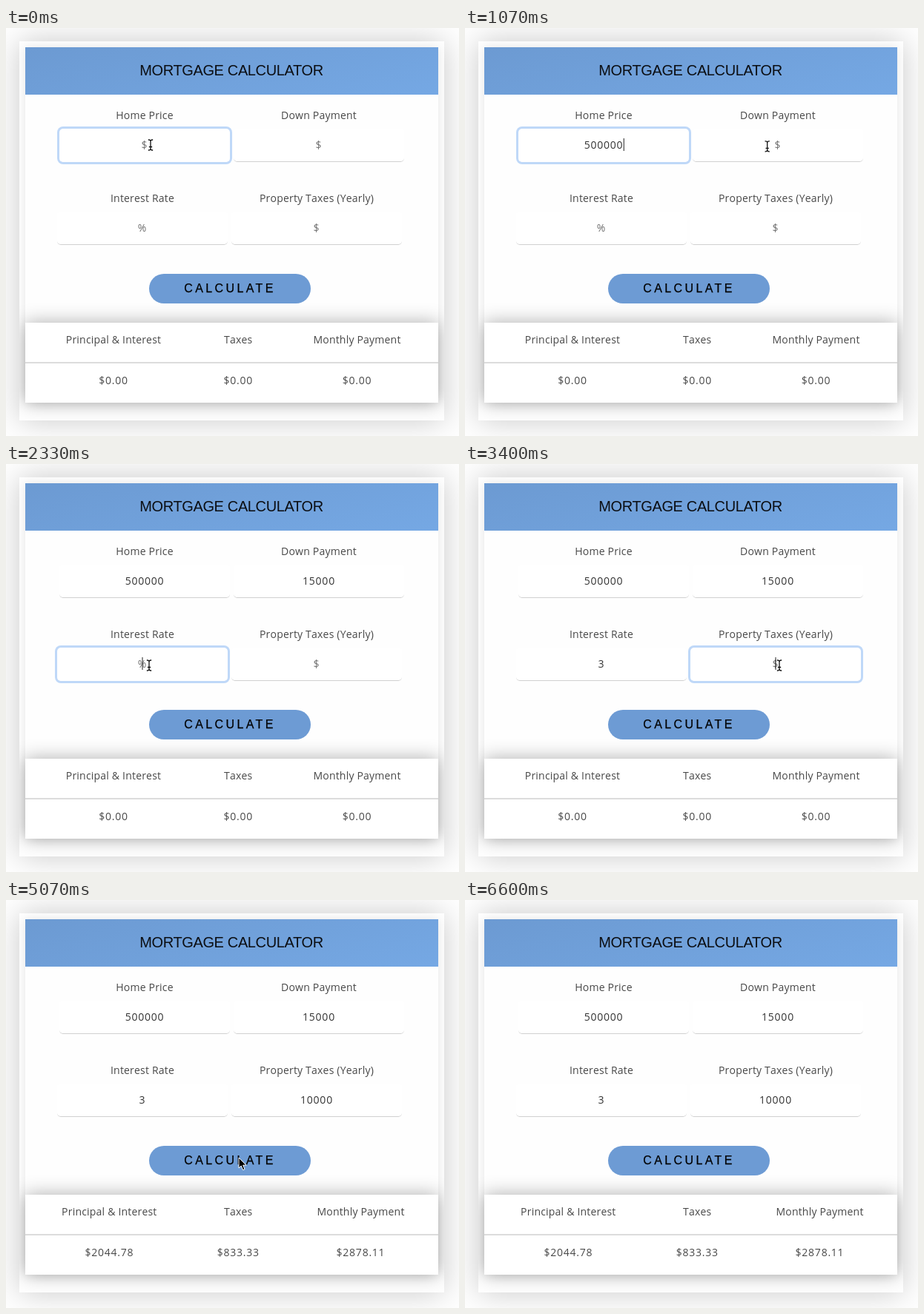
Recreate the animation shown at these times as an HTML page. Size 611 by 551 pixels, loop 6.67 s.

```html
<!DOCTYPE html>
<html lang="en">
<head>
<meta charset="utf-8">
<title>Mortgage Calculator</title>
<style>
  html, body { margin: 0; width: 100%; height: 100%; overflow: hidden; background: #fff; }
  #stage { position: absolute; left: 0; top: 0; width: 611px; height: 551px; overflow: hidden; }
  #stage div { position: absolute; box-sizing: border-box; }
  #frame { left: 18px; top: 18px; width: 573px; height: 512px; }
  #shade { inset: 0; box-shadow: 0 0 40px rgba(0,0,0,.22); }
  #clip { inset: 0; background: #fefefe; overflow: hidden; }
  #card { left: 8px; top: 8px; width: 557px; height: 480px; background: #fefefe; box-shadow: 0 0 14px rgba(0,0,0,.1); }
  #head { left: 8px; top: 8px; width: 557px; height: 64px; background: linear-gradient(165deg, #6c9ad2, #75a8e4); }
  #results { left: 8px; top: 380px; width: 557px; height: 108px; background: #fff; box-shadow: 0 0 24px rgba(0,0,0,.32); }
  #rule { left: 0; top: 53px; width: 557px; height: 2px; background: #dcdcdc; }
  #button { left: 193px; top: 332px; width: 218px; height: 40px; border-radius: 20px; background: #6d9bd4; }
  .field { width: 230px; height: 45px; background: #fff; border-bottom: 1px solid #d0d0d0; border-radius: 5px; }
  .field.focus { border-color: #fff; box-shadow: 0 0 0 3px #bfd8f8; }
  svg { position: absolute; left: 0; top: 0; }
  text { font: 14px "Open Sans", "Noto Sans", sans-serif; font-kerning: none; letter-spacing: .2px; fill: #484848; text-anchor: middle; }
  .num { letter-spacing: .75px; }
  .value { fill: #333; }
  .value.empty { fill: #6c6c6c; }
  .title { font: 20px "Liberation Sans", Arial, sans-serif; letter-spacing: -.36px; fill: #0c0f14; }
  .action { font: 16px "Liberation Sans", Arial, sans-serif; letter-spacing: 3.4px; fill: #000; stroke: #000; stroke-width: .25; text-anchor: start; }
</style>
</head>
<body>
<div id="stage">
  <div id="frame">
    <div id="shade"></div>
    <div id="clip">
      <div id="card"></div>
      <div id="head"></div>
      <div id="results"><div id="rule"></div></div>
    </div>
  </div>
  <div id="button"></div>
  <svg id="ink" width="611" height="551" viewBox="0 0 611 551">
    <text class="title" x="304" y="64">MORTGAGE CALCULATOR</text>
    <text class="action" x="240.2" y="357">CALCULATE</text>
  </svg>
</div>
<script>
const LOOP = 6670, STEP = 66.7;
const stage = document.getElementById('stage');
const ink = document.getElementById('ink');

function shape(tag, attrs, parent = ink) {
  const el = document.createElementNS('http://www.w3.org/2000/svg', tag);
  for (const key in attrs) el.setAttribute(key, attrs[key]);
  parent.appendChild(el);
  return el;
}

function label(x, y, str, cls = '') {
  const el = shape('text', { x, y, class: cls });
  el.textContent = str;
  return el;
}

// Focus period, text and the moment of each key press
const fields = [
  { name: 'Home Price', hint: '$', x: 72, y: 136, from: -600, to: 1200, text: '500000', keys: [230, 365, 430, 480, 525, 595] },
  { name: 'Down Payment', hint: '$', x: 307, y: 136, from: 1200, to: 2065, text: '15000', keys: [1400, 1465, 1530, 1595, 1665] },
  { name: 'Interest Rate', hint: '%', x: 69, y: 248, from: 2065, to: 3265, text: '3', keys: [2530] },
  { name: 'Property Taxes (Yearly)', hint: '$', x: 304, y: 248, from: 3265, to: 4865, text: '10000', keys: [3600, 3730, 3865, 3930, 4000] }
];

for (const f of fields) {
  f.box = document.createElement('div');
  f.box.style.left = f.x + 'px';
  f.box.style.top = f.y + 'px';
  stage.insertBefore(f.box, ink);
  f.mid = f.x + 115;
  label(f.mid, f.y - 13, f.name);
  f.value = label(f.mid, f.y + 27, '');
}

// Column text and centre, before and after the calculation
const columns = [
  { name: 'Principal & Interest', x: [145, 139.3], sum: ['$0.00', '$2044.78'] },
  { name: 'Taxes', x: [313.3, 313.3], sum: ['$0.00', '$833.33'] },
  { name: 'Monthly Payment', x: [473.5, 478.5], sum: ['$0.00', '$2878.11'] }
];

for (const c of columns) {
  c.head = label(0, 426, c.name);
  c.cell = label(0, 481, '', 'num');
}

const caret = shape('rect', { width: 1, height: 17, fill: '#222' });

const beam = shape('g', { fill: 'none', 'stroke-linecap': 'square' });
const beamPath = 'M-2.5 -7 Q0 -7 0 -5 Q0 -7 2.5 -7 M0 -5 V5 M-2.5 7 Q0 7 0 5 Q0 7 2.5 7 M-1.5 2.5 H1.5';
shape('path', { d: beamPath, stroke: '#fff', 'stroke-width': 3 }, beam);
shape('path', { d: beamPath, stroke: '#111', 'stroke-width': 1.3 }, beam);

const arrow = shape('path', {
  d: 'M0 0 V14 L3.2 11 L5.6 16.6 L8 15.6 L5.7 10.2 H10 Z',
  fill: '#000', stroke: '#fff', 'stroke-width': 1, 'stroke-linejoin': 'round'
});

const path = [
  [0, 195, 158], [800, 195, 158], [1130, 430, 160], [1735, 430, 160],
  [2060, 193, 272], [2735, 193, 272], [3200, 424, 272], [4280, 424, 272],
  [4800, 314, 348], [5200, 314, 348], [5560, 570, 420]
];
const visible = [[0, 230], [800, 1400], [1730, 2530], [2730, 3600], [4265, 5555]];

function pointerAt(t) {
  let i = 0;
  while (i < path.length - 2 && t >= path[i + 1][0]) i++;
  const [t0, x0, y0] = path[i], [t1, x1, y1] = path[i + 1];
  const u = Math.min(1, (t - t0) / (t1 - t0));
  const e = u * u * (3 - 2 * u);
  return [x0 + (x1 - x0) * e, y0 + (y1 - y0) * e];
}

const show = (el, on) => el.setAttribute('visibility', on ? 'visible' : 'hidden');

function drawFields(t) {
  show(caret, false);
  for (const f of fields) {
    const focused = t >= f.from && t < f.to;
    const pressed = f.keys.filter(k => k <= t);
    const n = pressed.length;
    f.box.className = focused ? 'field focus' : 'field';
    f.value.textContent = n ? f.text.slice(0, n) : f.hint;
    f.value.setAttribute('class', n ? 'num value' : 'num value empty');
    if (!focused) continue;
    const last = n ? pressed[n - 1] : f.from;
    caret.setAttribute('x', f.mid + n * 4.375 + (n ? .5 : -.5));
    caret.setAttribute('y', f.y + 13);
    show(caret, (t - last) % 1060 < 530);
  }
}

function drawResults(t) {
  const done = t >= 4865 ? 1 : 0;
  for (const c of columns) {
    c.head.setAttribute('x', c.x[done]);
    c.cell.setAttribute('x', c.x[done]);
    c.cell.textContent = c.sum[done];
  }
}

function drawPointer(t) {
  const [x, y] = pointerAt(t);
  const on = visible.some(([a, b]) => t >= a && t < b);
  const typing = fields.some(f => x > f.x && x < f.x + 230 && y > f.y && y < f.y + 45);
  const place = `translate(${x.toFixed(1)} ${y.toFixed(1)})`;
  beam.setAttribute('transform', place);
  arrow.setAttribute('transform', place);
  show(beam, on && typing);
  show(arrow, on && !typing);
}

const start = performance.now();

function draw(now) {
  const ms = Math.max(0, now - start) % LOOP;
  const t = Math.floor((ms + 5) / STEP) * STEP % LOOP;
  drawFields(t);
  drawResults(t);
  drawPointer(t);
  requestAnimationFrame(draw);
}
draw(start);
</script>
</body>
</html>
```
